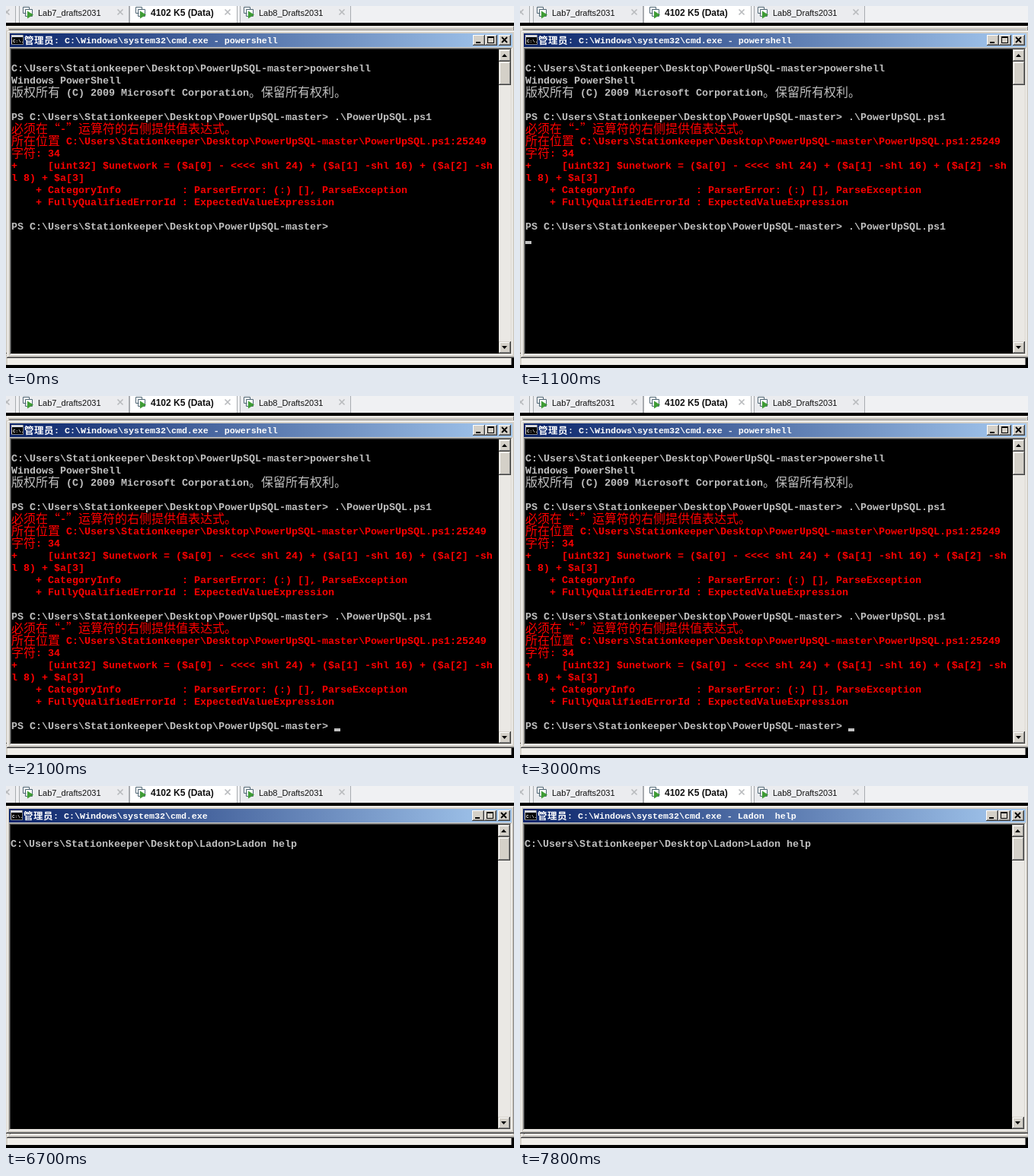
An HTML page for the animation above (8 s loop, 667 by 476 pixels).

```html
<!DOCTYPE html>
<html lang="zh-CN">
<head>
<meta charset="utf-8">
<title>Console session</title>
<style>
  html, body { margin: 0; width: 100%; height: 100%; overflow: hidden; background: #000; }
  svg { display: block; width: 667px; height: 476px; }
  text { white-space: pre; }
  rect { shape-rendering: crispEdges; }
  .mono { font-family: "Liberation Mono", monospace; font-weight: bold; }
  .cjk { font-family: "Noto Sans CJK SC", "Noto Sans CJK", sans-serif; }
  .tab { font: 11px "Liberation Sans", sans-serif; }
  .current { font-size: 12px; font-weight: bold; }
</style>
</head>
<body>
<svg id="stage" viewBox="0 0 667 476" xmlns="http://www.w3.org/2000/svg"></svg>
<script>
const stage = document.getElementById('stage');
const LOOP = 8000, FACE = '#d4d0c8', SHADOW = '#808080', DARK = '#404040';
const SILVER = '#c0c0c0', RED = '#f00';
const CELL = { w: 8, h: 16 };

const HOME = 'C:\\Users\\Stationkeeper\\Desktop\\';
const PROMPT = `PS ${HOME}PowerUpSQL-master>`;
const COMMAND = ' .\\PowerUpSQL.ps1';
const BANNER = [
  '', HOME + 'PowerUpSQL-master>powershell',
  'Windows PowerShell',
  '版权所有 (C) 2009 Microsoft Corporation。保留所有权利。', ''
];
const ERROR = [
  '必须在“-”运算符的右侧提供值表达式。',
  `所在位置 ${HOME}PowerUpSQL-master\\PowerUpSQL.ps1:25249`,
  '字符: 34',
  '+     [uint32] $unetwork = ($a[0] - <<<< shl 24) + ($a[1] -shl 16) + ($a[2] -sh',
  'l 8) + $a[3]',
  '    + CategoryInfo          : ParserError: (:) [], ParseException',
  '    + FullyQualifiedErrorId : ExpectedValueExpression'
];

const within = (t, ...spans) => spans.some(([from, to]) => t >= from && t < to);
const escape = s => s.replace(/&/g, '&amp;').replace(/</g, '&lt;').replace(/>/g, '&gt;');
const rect = (x, y, w, h, fill) => `<rect x="${x}" y="${y}" width="${w}" height="${h}" fill="${fill}"/>`;
const path = (d, fill, stroke = 'none', width = 1) =>
  `<path d="${d}" fill="${fill}" stroke="${stroke}" stroke-width="${width}"/>`;

// Nested one-pixel borders, given as [topLeft, bottomRight] pairs from the outside in.
function bevel(x, y, w, h, edges, fill) {
  let out = '';
  for (const [light, dark] of edges) {
    out += rect(x, y, w, h, dark) + rect(x, y, w - 1, h - 1, light);
    x++; y++; w -= 2; h -= 2;
  }
  return out + rect(x, y, w, h, fill);
}
const captionButton = x => bevel(x, 6, 16, 14, [['#fff', DARK], [FACE, SHADOW]], FACE);
const scrollButton = (y, h) => bevel(646, y, 16, h, [[FACE, DARK], ['#fff', SHADOW]], FACE);

// Lays out mixed text on a fixed grid: wide characters take their own advance.
function gridText(s, x, y, fill, narrow, wide, wideSize, wideClass) {
  let out = '';
  for (const run of s.match(/[\x00-\x7f]+|[^\x00-\x7f]/g) || []) {
    const ascii = run.charCodeAt(0) < 128;
    out += ascii
      ? `<text class="mono" x="${x}" y="${y}" fill="${fill}" font-size="${narrow / 0.6}">${escape(run)}</text>`
      : `<text class="cjk" x="${x}" y="${y + 1}" fill="${fill}" font-size="${wideSize}" ${wideClass}>${run}</text>`;
    x += ascii ? run.length * narrow : wide;
  }
  return out;
}

function tab(x, w, label, current) {
  const icon = path('M9.5 9.5h-4v-8h8v3M8.5 4.5h9v9h-9z', '#fff', '#4d6473') + path('M11 6.5l8 5-8 5z', '#3f9c35');
  return rect(x, 0, w, 22, '#a9acb0') + rect(x + 1, 0, w - 2, 22, current ? '#fff' : '#ebecef') +
    `<g transform="translate(${current ? x + 3 : x})">${icon}
      <text class="tab${current ? ' current' : ''}" x="25" y="13" fill="#111">${label}</text></g>`;
}
const cross = x => path(`M${x - 3.5} 4.5l7 7m0-7l-7 7`, 'none', '#b8babd', 1.6);

function tabs() {
  return rect(0, 0, 667, 22, '#f0f1f3') + rect(0, 0, 13, 22, '#ebecef') + rect(12, 0, 1, 22, '#a9acb0') +
    tab(17, 145, 'Lab7_drafts2031', false) + tab(162, 142, '4102 K5 (Data)', true) +
    tab(307, 146, 'Lab8_Drafts2031', false) +
    [1, 150, 291, 441].map(cross).join('');
}

// Console window: 80 x 25 cells; the client area starts at 6,25.
function consoleWindow(x, y, title, active, lines, cursor) {
  const right = 664;
  let out = bevel(0, 0, 668, 431, [[FACE, DARK], ['#fff', SHADOW]], FACE) +
    rect(4, 4, 660, 18, `url(#${active ? 'active' : 'inactive'})`) +
    bevel(6, 6, 16, 13, [[FACE, SHADOW]], '#000') + rect(7, 7, 14, 2, '#d8dce8') +
    '<text class="mono" x="8" y="16" font-size="6" fill="#fff">C:\\.</text>' +
    gridText('管理员: ' + title, 23, 17, active ? '#fff' : FACE, 7, 13, 12.5, 'font-weight="bold"');

  out += [right - 52, right - 36, right - 18].map(captionButton).join('') +
    rect(right - 48, 15, 6, 2, '#000') +
    rect(right - 33, 8, 9, 9, '#000') + rect(right - 32, 10, 7, 6, FACE) +
    path(`M${right - 14} 9l7 7m0-7l-7 7`, 'none', '#000', 1.8);

  out += bevel(4, 23, 660, 404, [[SHADOW, '#fff'], [DARK, FACE]], '#000') +
    rect(646, 25, 16, 400, '#eae8e4') +
    scrollButton(25, 16) + scrollButton(41, 31) + scrollButton(409, 16) +
    path('M650 35h7l-3.5-4zM650 415h7l-3.5 4z', '#000');

  lines.forEach(([s, fill], row) => {
    out += gridText(s, 6, 38 + row * CELL.h, fill, CELL.w, 16, 16, '');
  });
  if (cursor) {
    const [column, row] = cursor;
    out += rect(6 + column * CELL.w, 37 + row * CELL.h, CELL.w, 4, SILVER);
  }
  return `<g transform="translate(${x} ${y})">${out}</g>`;
}

const paint = (lines, fill) => lines.map(s => [s, fill]);

function powershell(t) {
  const typed = t >= 800, failed = t >= 1200;
  const lines = [
    ...paint([...BANNER, PROMPT + COMMAND], SILVER), ...paint(ERROR, RED),
    ...paint(['', PROMPT + (typed ? COMMAND : '')], SILVER)
  ];
  if (failed) lines.push(...paint(ERROR, RED), ...paint(['', PROMPT], SILVER));
  let cursor = null;
  if (within(t, [100, 600])) cursor = [53, 14];
  if (within(t, [1100, 1200])) cursor = [0, 15];
  if (within(t, [2100, 2600], [3000, 3300])) cursor = [53, 23];
  return consoleWindow(1, 32, 'C:\\Windows\\system32\\cmd.exe - powershell', t < 3300, lines, cursor);
}

function ladon(t) {
  const title = 'C:\\Windows\\system32\\cmd.exe' + (t >= 7800 ? ' - Ladon  help' : '');
  const lines = paint(['', HOME + 'Ladon>Ladon help'], SILVER);
  return consoleWindow(0, 26, title, t >= 6700, lines, within(t, [7200, 7700]) && [47, 1]);
}

const gradient = (id, from, to) => `<linearGradient id="${id}">
  <stop stop-color="${from}"/><stop offset="1" stop-color="${to}"/></linearGradient>`;

// Lower edge of the window that lies behind both consoles.
const lowerEdge = rect(0, 440, 664, 32, FACE) + rect(2, 463, 661, 9, '#f0eee9') +
  rect(663, 440, 1, 32, SHADOW);

function scene(t) {
  const windows = [ladon(t), powershell(t)];
  if (t >= 6700) windows.reverse();
  return `<defs>${gradient('active', '#0a246a', '#a6caf0')}${gradient('inactive', SHADOW, SILVER)}</defs>` +
    rect(0, 0, 667, 476, '#000') + lowerEdge + windows.join('') + tabs();
}

let shown = '';
function tick() {
  const next = scene(performance.now() % LOOP);
  if (next !== shown) stage.innerHTML = shown = next;
  requestAnimationFrame(tick);
}
tick();
</script>
</body>
</html>
```
